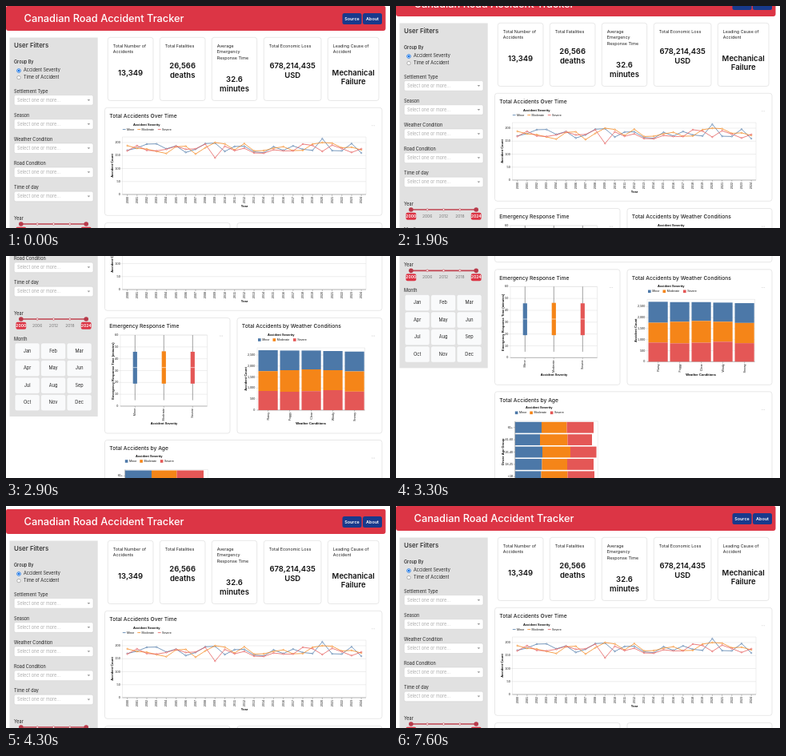
Recreate the animation shown at these times as an HTML page with a canvas. Size 480 px wide and 278 px high, loop 8000 ms.

```html
<!DOCTYPE html>
<html lang="en">
<head>
<meta charset="utf-8">
<title>Accident dashboard</title>
<style>
html, body { margin: 0; width: 100%; height: 100%; overflow: hidden; background: #fff; }
canvas { display: block; width: 480px; height: 278px; }
</style>
</head>
<body>
<canvas id="stage"></canvas>
<script>
const W = 480, H = 278, LOOP = 8000, STEP = 100;
const UI = 'Inter, sans-serif', CHART = '"Liberation Sans", Arial, sans-serif';
const RED = '#dc3545', BLUE = '#4c78a8', ORANGE = '#f58518', CORAL = '#e45756';
const SERIES = [BLUE, ORANGE, CORAL];
const LEVELS = ['Minor', 'Moderate', 'Severe'];
const canvas = document.getElementById('stage');
const ctx = canvas.getContext('2d');
const ratio = Math.max(1, window.devicePixelRatio || 1);
canvas.width = W * ratio;
canvas.height = H * ratio;

// [time, scroll offset]
const SCROLL = [
  [1500, 0], [1600, 1], [1700, 4], [1800, 10], [1900, 18], [2100, 46], [2400, 104],
  [2900, 194], [3200, 244], [3500, 276], [3700, 274], [3800, 261], [3900, 222],
  [4000, 152], [4100, 72], [4200, 10], [4300, -4], [4400, -5], [4600, -2], [4800, 0]
];

function scrollAt(t) {
  if (t <= SCROLL[0][0]) return 0;
  for (let i = 1; i < SCROLL.length; i++) {
    const [t0, y0] = SCROLL[i - 1], [t1, y1] = SCROLL[i];
    if (t <= t1) return y0 + (y1 - y0) * (t - t0) / (t1 - t0);
  }
  return 0;
}

function text(str, x, y, size, { color = '#222', weight = 400, align = 'left', font = UI, turn = false } = {}) {
  ctx.save();
  ctx.translate(x, y);
  if (turn) ctx.rotate(-Math.PI / 2);
  ctx.font = `${weight} ${size}px ${font}`;
  ctx.fillStyle = color;
  ctx.textAlign = align;
  ctx.textBaseline = 'middle';
  ctx.fillText(str, 0, 0);
  ctx.restore();
}

const label = (str, x, y, opts) => text(str, x, y, 3.7, { font: CHART, color: '#111', ...opts });
const heading = (str, x, y, opts) =>
  text(str, x, y, 4, { font: CHART, color: '#000', weight: 700, align: 'center', ...opts });

function rect(x, y, w, h, color) {
  ctx.fillStyle = color;
  ctx.fillRect(x, y, w, h);
}

function box(x, y, w, h, r, fill, stroke, width = 0.6) {
  ctx.beginPath();
  ctx.roundRect(x, y, w, h, r);
  if (fill) { ctx.fillStyle = fill; ctx.fill(); }
  if (stroke) { ctx.strokeStyle = stroke; ctx.lineWidth = width; ctx.stroke(); }
}

function line(x0, y0, x1, y1, color = '#ddd', width = 0.5) {
  ctx.beginPath();
  ctx.moveTo(x0, y0);
  ctx.lineTo(x1, y1);
  ctx.strokeStyle = color;
  ctx.lineWidth = width;
  ctx.stroke();
}

function dot(x, y, r, fill, stroke, width = 0.6) {
  ctx.beginPath();
  ctx.arc(x, y, r, 0, Math.PI * 2);
  if (fill) { ctx.fillStyle = fill; ctx.fill(); }
  if (stroke) { ctx.strokeStyle = stroke; ctx.lineWidth = width; ctx.stroke(); }
}

function card(x0, y0, x1, y1) {
  box(x0, y0, x1 - x0, y1 - y0, 3, '#fff', '#d9d9d9');
}

function chartCard(title, x0, y0, x1, y1) {
  card(x0, y0, x1, y1);
  text(title, x0 + 5.8, y0 + 10.7, 6.7, { weight: 500 });
  for (let i = -1; i <= 1; i++) dot(x1 - 11 + i * 1.7, y0 + 22.5, 0.4, '#aaa');
}

function legend(x, y, titleX, marks) {
  heading('Accident Severity', titleX, y, { align: 'left' });
  [0, 18.5, 44].forEach((dx, i) => {
    marks(x + dx, y + 6, SERIES[i]);
    label(LEVELS[i], x + dx + 5.2, y + 6);
  });
}

const swatch = (x, y, color) => rect(x, y - 1.8, 3.6, 3.6, color);

function plotFrame(x0, y0, x1, y1, ticks) {
  for (const [y, name] of ticks) {
    line(x0 - 2, y, x1, y);
    label(name, x0 - 2.8, y, { align: 'right' });
  }
  box(x0, y0, x1 - x0, y1 - y0, 0, null, '#ddd', 0.5);
  line(x0, y1, x1, y1, '#888');
}

function drawHeader() {
  box(0, 0, 474.5, 31, [2, 2, 3, 3], RED);
  text('Canadian Road Accident Tracker', 22.5, 16, 12.8, { color: '#fff', weight: 500 });
  [['Source', 420.5, 24], ['About', 446, 24]].forEach(([name, x, w]) => {
    box(x, 9, w, 14, 2.5, '#183a8c');
    text(name, x + w / 2, 16, 5.4, { color: '#fff', weight: 600, align: 'center' });
  });
}

function drawSidebar() {
  rect(4.5, 39.5, 110.2, 355.5, '#e1e1e1');
  text('User Filters', 10, 50, 7.9, { weight: 500 });
  text('Group By', 10, 70.3, 5.5, { weight: 500 });
  dot(16, 81, 2.3, '#fff', '#1673e6', 0.9);
  dot(16, 81, 1.3, '#1673e6');
  dot(16, 89.6, 2.2, '#fff', '#777', 0.5);
  text('Accident Severity', 22, 80.8, 5.5);
  text('Time of Accident', 22, 89.6, 5.5);

  ['Settlement Type', 'Season', 'Weather Condition', 'Road Condition', 'Time of day'].forEach((name, i) => {
    const y = 107 + i * 30.15;
    text(name, 10, y, 5.5);
    box(10.2, y + 4.6, 98.8, 12.6, 2, '#fff', '#ccc', 0.5);
    text('Select one or more...', 14, y + 10.9, 5.5, { color: '#aaa' });
    ctx.beginPath();
    ctx.moveTo(101.6, y + 9.9);
    ctx.lineTo(105.2, y + 9.9);
    ctx.lineTo(103.4, y + 11.9);
    ctx.fillStyle = '#999';
    ctx.fill();
  });

  text('Year', 10, 266.3, 5.5);
  line(18.7, 273, 100, 273, '#c14350', 1.7);
  for (let i = 0; i < 5; i++) {
    const x = 18.8 + i * 20.35, year = String(2000 + i * 6);
    const end = i % 4 === 0;
    if (end) {
      dot(x, 273, 2.8, '#b83a4a');
      box(x - 6.4, 276.8, 12.8, 9, 2, RED);
    } else {
      dot(x, 273, 1.3, '#fff', '#c14350');
    }
    text(year, x, 281.3, 5, { color: end ? '#fff' : '#777', weight: end ? 600 : 400, align: 'center' });
  }

  text('Month', 10, 298, 5.5);
  'Jan Feb Mar Apr May Jun Jul Aug Sep Oct Nov Dec'.split(' ').forEach((name, i) => {
    const x = 26.6 + (i % 3) * 32.5, y = 313.2 + Math.floor(i / 3) * 21.5;
    box(x - 15.5, y - 10.1, 31, 20.2, 2.5, '#f9fafb', '#d5d5d5', 0.4);
    text(name, x, y, 5.6, { align: 'center' });
  });
}

const STATS = [
  [127.3, 184, ['Total Number of', 'Accidents'], ['13,349'], 84],
  [192.3, 249, ['Total Fatalities'], ['26,566', 'deaths'], 75],
  [257.3, 313.7, ['Average', 'Emergency', 'Response Time'], ['32.6', 'minutes'], 92.3],
  [322.3, 394, ['Total Economic Loss'], ['678,214,435', 'USD'], 75],
  [402.3, 466, ['Leading Cause of', 'Accident'], ['Mechanical', 'Failure'], 83.7]
];

function drawStats() {
  for (const [x0, x1, name, value, y] of STATS) {
    card(x0, 39.3, x1, 118.5);
    name.forEach((s, i) => text(s, x0 + 6.5, 50 + i * 7.7, 5.4));
    value.forEach((s, i) => text(s, (x0 + x1) / 2, y + i * 11.9, 9.5, { weight: 600, align: 'center', color: '#111' }));
  }
}

const COUNTS = [
  [170, 179, 194, 195, 176, 187, 162, 174, 196, 198, 166, 185, 186, 164, 161, 184, 170, 187, 174, 170, 215, 169, 168, 196, 160],
  [188, 178, 175, 166, 158, 184, 186, 156, 180, 200, 195, 172, 196, 168, 169, 178, 184, 169, 170, 194, 200, 198, 180, 182, 172],
  [168, 188, 170, 168, 174, 186, 174, 176, 194, 141, 186, 169, 178, 160, 159, 172, 168, 168, 194, 189, 166, 190, 177, 162, 176]
];

function drawTimeline() {
  chartCard('Total Accidents Over Time', 123.5, 127.3, 470, 262.3);
  legend(145.8, 148.6, 159, (x, y, color) => line(x, y, x + 3.8, y, color, 0.8));
  const toY = v => 236 - v * 0.325;
  plotFrame(145.5, 164, 450, 236, [0, 50, 100, 150, 200].map(v => [toY(v), String(v)]));
  const toX = i => 151.6 + i * 12.19;
  for (let i = 0; i < 25; i++) {
    line(toX(i), 236, toX(i), 238, '#888');
    label(String(2000 + i), toX(i), 239, { align: 'right', turn: true });
  }
  COUNTS.forEach((row, s) => {
    ctx.beginPath();
    row.forEach((v, i) => ctx.lineTo(toX(i), toY(v)));
    ctx.strokeStyle = SERIES[s];
    ctx.lineWidth = 0.75;
    ctx.stroke();
    row.forEach((v, i) => dot(toX(i), toY(v), 0.8, '#fff', SERIES[s], 0.6));
  });
  heading('Year', 298, 250.5);
  heading('Accident Count', 133.3, 200, { turn: true });
}

function drawResponse() {
  chartCard('Emergency Response Time', 123.5, 271.5, 280, 416);
  const toY = v => 382 - v * 1.483;
  plotFrame(143, 293, 251.5, 382, [0, 10, 20, 30, 40, 50, 60].map(v => [toY(v), String(v)]));
  LEVELS.forEach((name, i) => {
    const x = 161.3 + i * 36, top = toY(i === 1 ? 46.3 : 45.9);
    line(x, toY(60), x, toY(5), '#444');
    rect(x - 2.6, top, 5.2, toY(19) - top, SERIES[i]);
    line(x - 2.6, toY(32.6), x + 2.6, toY(32.6), '#fff', 0.6);
    line(x, 382, x, 384, '#888');
    label(name, x, 385, { align: 'right', turn: true });
  });
  heading('Accident Severity', 197.5, 404);
  heading('Emergency Response Time (minutes)', 133.6, 338, { turn: true });
}

// [name, top, blue/orange edge, orange/red edge]
const WEATHER = [
  ['Rainy', 312, 338.2, 363], ['Foggy', 312.4, 337, 364], ['Clear', 312.4, 336, 363.2],
  ['Windy', 313, 337, 362], ['Snowy', 313.7, 338.5, 363.8]
];

function drawWeather() {
  chartCard('Total Accidents by Weather Conditions', 289, 271.5, 470, 416);
  legend(315, 293, 327, swatch);
  plotFrame(314, 309, 448.5, 387,
    [0, 500, 1000, 1500, 2000, 2500].map(v => [387 - v * 0.0276, v.toLocaleString('en-US')]));
  WEATHER.forEach(([name, ...edges], i) => {
    const x = 327.6 + i * 27;
    edges.forEach((y, s) => rect(x - 12.1, y, 24.2, (edges[s + 1] || 387) - y, SERIES[s]));
    line(x, 387, x, 389, '#888');
    label(name, x, 390, { align: 'right', turn: true });
  });
  heading('Weather Conditions', 381, 404);
  heading('Accident Count', 300, 348, { turn: true });
}

// [name, blue/orange edge, orange/red edge, end]
const AGES = [
  ['61+', 182, 213.5, 247], ['41-60', 180, 214.5, 245], ['26-40', 183, 218, 250.5],
  ['18-25', 182.5, 214, 247], ['<18', 181.5, 214.5, 248]
];

function drawAges() {
  chartCard('Total Accidents by Age', 123.5, 424.5, 470, 574);
  legend(148.8, 445, 162, swatch);
  box(148.8, 461.5, 103.5, 78, 0, null, '#ddd', 0.5);
  AGES.forEach(([name, ...edges], i) => {
    const y = 469.4 + i * 15.4;
    edges.forEach((x, s) => {
      const from = s ? edges[s - 1] : 148.8;
      rect(from, y - 6.9, x - from, 13.8, SERIES[s]);
    });
    line(146.8, y, 148.8, y, '#888');
    label(name, 146, y, { align: 'right' });
  });
  line(148.8, 461.5, 148.8, 539.5, '#888');
  line(148.8, 539.5, 252.3, 539.5, '#888');
  heading('Driver Age Group', 134, 500, { turn: true });
  for (let i = 0; i <= 5; i++) {
    const x = 148.8 + i * 18.4;
    line(x, 539.5, x, 541.5, '#888');
    label((i * 500).toLocaleString('en-US'), x, 544.5, { align: 'center' });
  }
  heading('Accident Count', 200.5, 551);
}

function frame(now) {
  const t = Math.floor((now % LOOP) / STEP) * STEP;
  ctx.setTransform(ratio, 0, 0, ratio, 0, 0);
  rect(0, 0, W, H, '#fff');
  ctx.translate(0, -scrollAt(t));
  drawHeader();
  drawSidebar();
  drawStats();
  drawTimeline();
  drawResponse();
  drawWeather();
  drawAges();
  requestAnimationFrame(frame);
}
requestAnimationFrame(frame);
</script>
</body>
</html>
```
